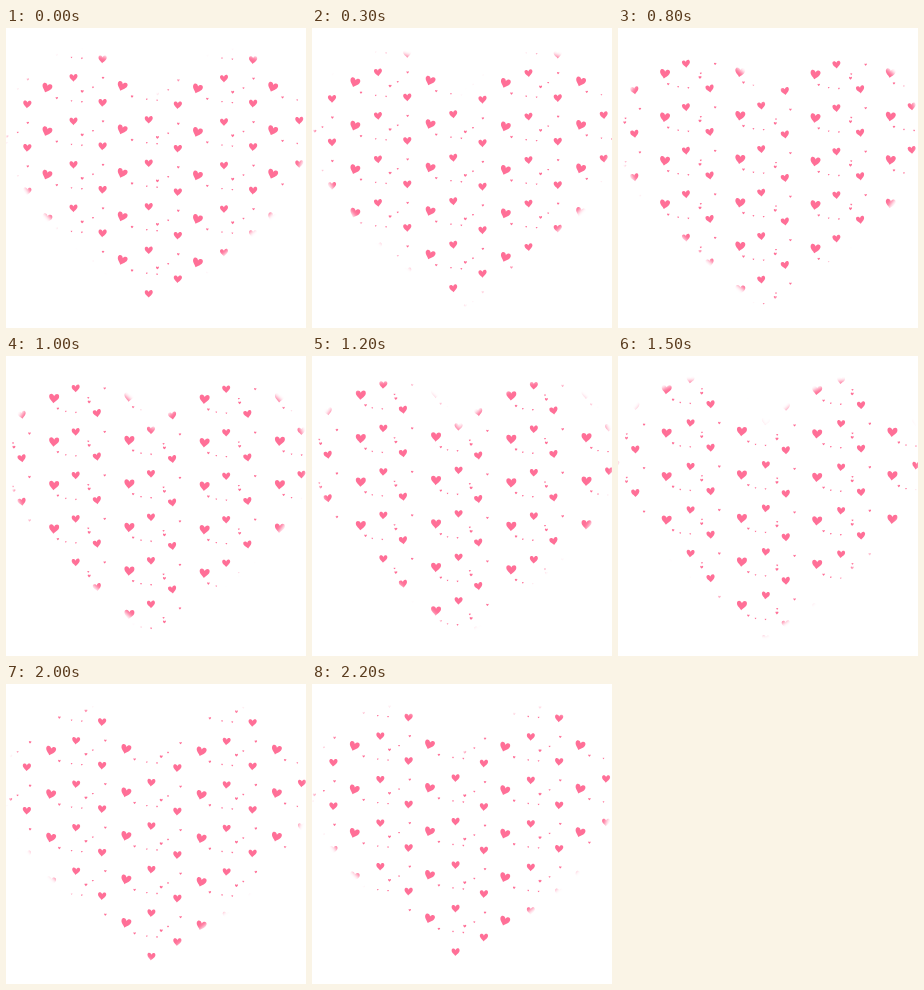
An HTML page with a canvas that plays this animation: 300x300 px, repeating every 2.3 s.

```html
<!DOCTYPE html>
<html lang="en">
<head>
<meta charset="utf-8">
<title>Heart of hearts</title>
<style>
  html, body { margin: 0; width: 100%; height: 100%; overflow: hidden; background: #fff; }
  canvas, svg { position: absolute; left: 0; top: 0; width: 300px; height: 300px; }
</style>
</head>
<body>
<canvas id="stage"></canvas>
<svg viewBox="0 0 300 300">
  <filter id="soft" filterUnits="userSpaceOnUse" x="-60" y="-60" width="420" height="420">
    <feGaussianBlur stdDeviation="2.2"/>
  </filter>
  <!-- White surround with a heart-shaped opening -->
  <path filter="url(#soft)" fill="#fff" fill-rule="evenodd" d="M-50-50H350V350H-50Z
    M147 74C138 58 118 27 80 25C42 23 4 55 2 100C2 140 25 168 43 189C70 216 122 258 146 279
    C175 263 245 207 270 180C286 160 301 128 302 105C302 65 268 25 226 25C192 28 164 58 147 74Z"/>
</svg>
<script>
const LOOP = 2300, STEP = 100;
const ROW = 43.5, COL = 75.25;

// Motion over a loop, p from 0 to 1.
const arch = (p, lean) => Math.sin(Math.PI * p ** lean);
const bow = (from, reach) => p => from + reach * arch(p, 1.25);
const swing = (mid, reach, peak) => p => mid + reach * Math.cos(2 * Math.PI * (p - peak));
const still = () => 0;

// One tile of the pattern: size, start height, sideways path, tilt, shift in odd columns.
const part = (size, y, x, tilt = still, odd = -2) => ({ size, y, x, tilt, odd });
const TILE = [
  part(10, 59.5, bow(41, 7.9), swing(9, 8, 0.05)),
  part(8, 49.5, swing(69.3, 3.2, 0.66), swing(-2.5, 7.5, 0.73)),
  part(8.2, 76, swing(18.6, 2.8, 0.97), swing(-6, 7, 0.93)),
  part(2.5, 70, swing(52, 3.2, 0.69)),
  part(2.5, 51.3, swing(23.2, 2.9, 0.67)),
  part(3, 63.3, bow(76.2, 7.8), still, 2),
  part(1.8, 59.3, swing(84.7, 2.4, 0.95), still, 2),
  part(1.7, 30.3, swing(73, 3.1, 0.94)),
  part(1.6, 72.8, swing(62.8, 3, 0.93))
];

const heart = new Path2D(
  "M-.05 .52C-.14 .32 -.5 .14 -.5 -.18C-.48 -.5 -.1 -.48 0 -.18C.1 -.48 .48 -.5 .5 -.18C.5 .14 .14 .32 -.05 .52Z");

const canvas = document.getElementById("stage");
const ctx = canvas.getContext("2d");
const scale = window.devicePixelRatio || 1;
canvas.width = canvas.height = Math.round(300 * scale);

function drawHeart(x, y, size, tilt) {
  ctx.save();
  ctx.translate(x, y);
  ctx.rotate(tilt * Math.PI / 180);
  ctx.scale(size, size);
  ctx.fill(heart);
  ctx.restore();
}

function draw(p) {
  ctx.setTransform(scale, 0, 0, scale, 0, 0);
  ctx.clearRect(0, 0, 300, 300);
  ctx.fillStyle = "#ff6f97";
  const rise = 2 * arch(p, 1.6) - ROW * p;
  for (const { size, y, x, tilt, odd } of TILE) {
    for (let c = -1; c < 4; c++) {
      const lift = c * 0.4 + (c % 2 ? odd : 0);
      for (let r = -2; r < 8; r++) {
        drawHeart(x(p) + c * COL, y + rise + lift + r * ROW, size, tilt(p));
      }
    }
  }
}

function tick() {
  const t = performance.now() % LOOP;
  draw(Math.floor(t / STEP) * STEP / LOOP);
  requestAnimationFrame(tick);
}
tick();
</script>
</body>
</html>
```
